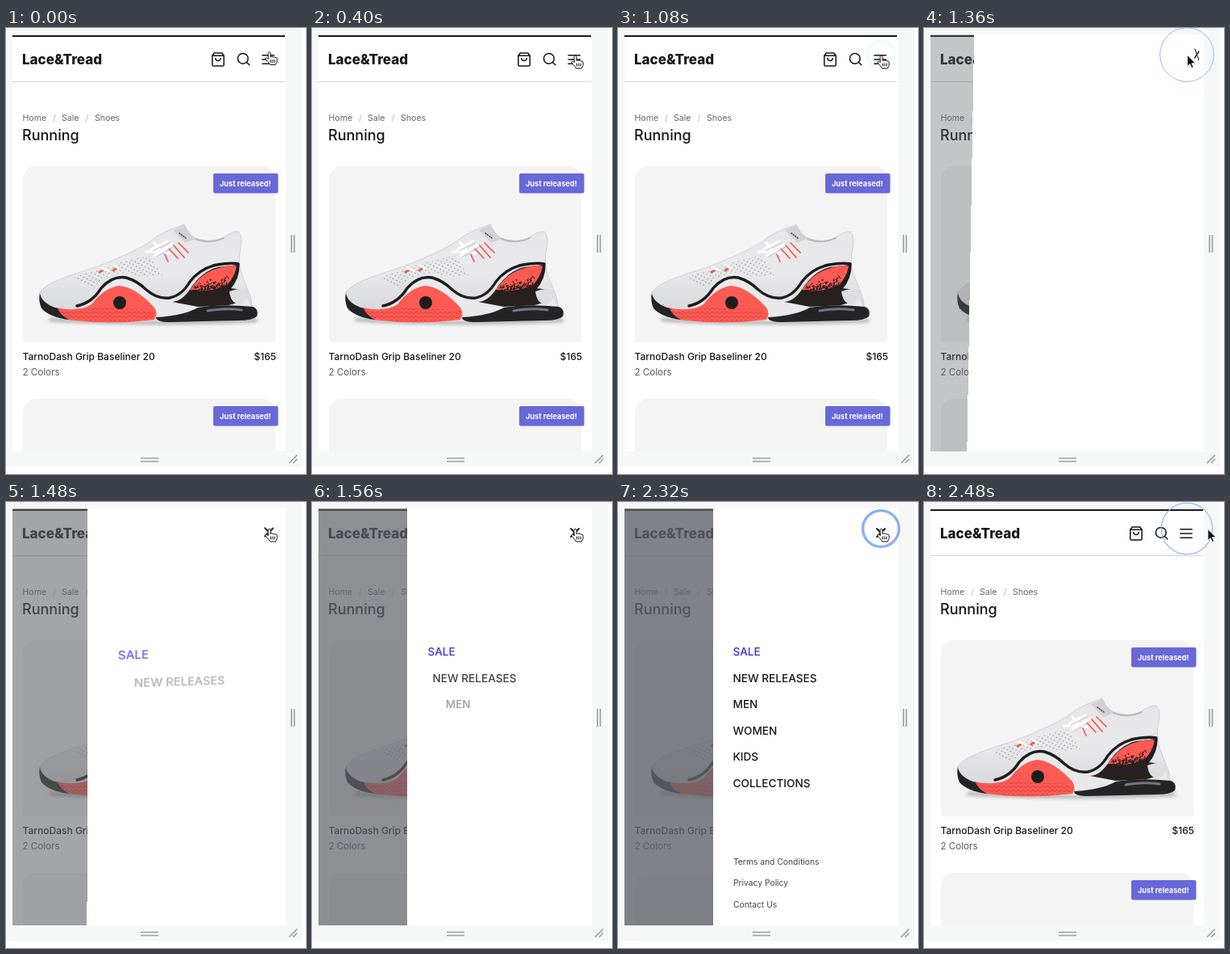
Recreate the animation shown at these times as an HTML page. Size 372 by 552 pixels, loop 2.52 s.

```html
<!DOCTYPE html>
<html lang="en">
<head>
<meta charset="utf-8">
<title>Swinging menu drawer</title>
<style>
  html, body { margin: 0; width: 372px; height: 552px; overflow: hidden; background: #fff; }
  svg { position: absolute; left: 0; top: 0; display: block; }
  text { font: 500 12px Inter, sans-serif; fill: #16161a; white-space: pre; }
  .logo { font-size: 17px; font-weight: 800; }
  .heading { font-size: 18px; }
  .crumb { font-size: 10.6px; font-weight: 400; fill: #66666c; }
  .slash { font-size: 10.6px; fill: #c4c4c8; }
  .colors { font-size: 11.6px; font-weight: 400; fill: #5a5a60; }
  .badge text { font-size: 9.2px; font-weight: 700; fill: #fff; }
  .item { font-size: 13.6px; }
  .item:first-child { fill: #3a30d0; }
  .legal { font-size: 10.3px; font-weight: 400; fill: #44444a; }
  .icon { fill: none; stroke: #16161a; stroke-width: 1.9; stroke-linecap: round; stroke-linejoin: round; }
  #viewport { position: absolute; left: 8px; top: 8px; width: 339px; height: 516px; overflow: hidden; }
  #backdrop { position: absolute; inset: 0; background: rgb(96, 99, 104); }
  #drawer { position: absolute; left: 110px; top: 0; width: 229px; height: 516px; background: #fff;
    box-shadow: 60px 0 #fff, 60px 60px #fff; transform-origin: 100% 22%; }
</style>
</head>
<body>
<svg width="372" height="552">
  <defs>
    <pattern id="holes" width="7" height="6" patternUnits="userSpaceOnUse" patternTransform="rotate(-14)">
      <circle cx="1.6" cy="1.5" r=".8" fill="#85858a"/><circle cx="5.1" cy="4.5" r=".8" fill="#85858a"/>
    </pattern>
    <pattern id="tread" width="6" height="5" patternUnits="userSpaceOnUse">
      <path d="M0 4l3-3 3 3" fill="none" stroke="#d8403a"/>
    </pattern>
    <linearGradient id="leather" x2="0" y2="1">
      <stop stop-color="#e6e6e8"/><stop offset=".5" stop-color="#e9e9eb"/><stop offset="1" stop-color="#d6d7da"/>
    </linearGradient>
    <filter id="soft" x="-10%" width="120%" y="-200%" height="500%"><feGaussianBlur stdDeviation="2"/></filter>
    <g id="badge" class="badge">
      <rect x="257" y="180" width="80.5" height="24.5" rx="2" fill="#6868d8"/>
      <text x="265" y="195.5">Just released!</text>
    </g>
  </defs>

  <rect width="367" height="543" fill="#f6f7f7"/>
  <rect x="8" y="8" width="339" height="516" fill="#fff"/>
  <rect x="8" y="9" width="338" height="2" fill="#18181e"/>
  <path d="M8 66.5H346" stroke="#d6d6d8"/>
  <text class="logo" x="20" y="45">Lace&amp;Tread</text>
  <g class="icon">
    <path transform="translate(253.4 29.4) scale(.8)" d="M6 2 3 6v14a2 2 0 0 0 2 2h14a2 2 0 0 0 2-2V6l-3-4zM3 6h18M16 10a4 4 0 0 1-8 0"/>
    <path transform="translate(285 29) scale(.8)" d="M3 11a8 8 0 1 0 16 0a8 8 0 1 0-16 0M21 21l-4.4-4.4"/>
    <path transform="translate(315.5 29.4) scale(.8)" d="M3 5.5h18M3 12h18M3 18.5h18"/>
  </g>

  <text class="crumb" x="20.5" y="115">Home</text>
  <text class="slash" x="58" y="115">/</text>
  <text class="crumb" x="69" y="115">Sale</text>
  <text class="slash" x="98.5" y="115">/</text>
  <text class="crumb" x="110" y="115">Shoes</text>
  <text class="heading" x="20" y="139">Running</text>

  <path d="M21 187a16 16 0 0 1 16-16H318a16 16 0 0 1 16 16V385a4 4 0 0 1-4 4H25a4 4 0 0 1-4-4z" fill="#f4f4f4"/>
  <path d="M21 524V475a16 16 0 0 1 16-16H318a16 16 0 0 1 16 16V524z" fill="#f4f4f4"/>

  <g stroke-linecap="round" stroke-linejoin="round">
    <path d="M55 361Q170 368 310 362" fill="none" stroke="#aaa" stroke-width="4" filter="url(#soft)"/>
    <path d="M42 327C52 313 82 306 116 294C146 282 172 271 187 258C198 252 206 248 211 247L221 243Q226 255 235 260Q250 266 267 261Q280 251 288 252Q294 257 291 272Q287 288 292 304L304 335L306 350L190 357L70 356L46 346Q39 336 42 327z" fill="url(#leather)" stroke="#c6c6ca" stroke-width=".7"/>
    <path d="M207 250l14-6q6 11 14 17l-13 5z" fill="#d2d2d6"/>
    <path d="M235 261Q252 268 270 260" fill="none" stroke="#b9b9be" stroke-width="2"/>
    <path d="M82 310Q130 291 178 282L194 306Q168 310 148 303Q124 304 108 322z" fill="url(#holes)"/>
    <path d="M90 346Q108 340 121 320Q145 300 165 315Q186 336 206 334L296 327L306 350L190 363L176 360z" fill="#e9e9eb"/>
    <path d="M62 346Q90 352 106 342Q121 322 140 319Q160 320 184 346Q189 354 184 361Q130 368 76 361Q62 356 62 346z" fill="#fb5b53"/>
    <path d="M64 348Q92 352 110 346L180 349L184 360Q130 366 77 360Q66 356 64 348z" fill="url(#tread)"/>
    <path d="M42 328Q44 341 64 347Q67 355 78 361Q54 358 44 347Q40 338 42 328z" fill="#242427"/>
    <path d="M186 358Q220 356 238 346Q268 341 306 345Q314 348 311 357Q306 362 288 362L204 364Q186 364 186 358z" fill="#242427"/>
    <path d="M250 350Q271 346 292 349" fill="none" stroke="#77777d" stroke-width="3"/>
    <path d="M206 339Q220 338 231 319Q245 300 263 296L287 293Q285 310 278 322Q294 324 299 326Q294 340 276 343L238 345z" fill="#28201f"/>
    <path d="M228 324Q243 302 264 297Q280 292 286 295Q283 309 274 318Q252 328 228 324z" fill="#fb5b53"/>
    <g id="speckles"/>
    <path d="M277 326Q290 321 298 324Q303 334 292 342Q279 343 277 326z" fill="#dedee1"/>
    <path d="M88 344Q107 340 118 322Q132 306 149 309Q163 313 174 324Q188 336 203 334Q218 331 228 314Q241 297 262 293Q279 290 288 292Q288 310 277 322" fill="none" stroke="#1d1d20" stroke-width="3.4"/>
    <circle cx="141" cy="340" r="8" fill="#1d1d20"/>
    <path d="M195 276l6 13M200 271l13 14M207 268l14 16M214 266l12 12" stroke="#f2574e" stroke-width="1.7"/>
    <path d="M181 274l19-10M185 281l21-13M184 266q8 12 18 13M174 277l16-1" fill="none" stroke="#fff" stroke-width="3.4"/>
    <path d="M182 276l20-10M187 283l20-12" stroke="#b5b5ba" stroke-width=".8"/>
    <path d="M116 302l4-2M133 300l3-2" stroke="#f2574e" stroke-width="3"/>
    <path d="M118 297l8 3M134 293l5 4" stroke="#fff" stroke-width="3"/>
    <path d="M215 254l8 6" stroke="#444" stroke-width="1.5" stroke-dasharray="1 2"/>
  </g>

  <use href="#badge"/>
  <use href="#badge" y="288"/>
  <text x="20.5" y="411">TarnoDash Grip Baseliner 20</text>
  <text x="335" y="411" text-anchor="end">$165</text>
  <text class="colors" x="20.5" y="430">2 Colors</text>
</svg>

<div id="viewport">
  <div id="backdrop"></div>
  <div id="drawer">
    <svg width="229" height="516" viewBox="118 8 229 516">
      <path class="icon" d="M331 33l-10 10M321 33l10 10"/>
      <g id="menu"></g>
      <g id="legal"></g>
    </svg>
  </div>
</div>

<svg width="372" height="552">
  <path d="M354 256v22M357.5 256v22M167 532.5h22M167 536.5h22M351 538.5l10-10M356 538.5l5-5" fill="none" stroke="#9c9da0" stroke-width="1.6"/>
  <circle id="ring" cx="326" cy="33" fill="none" stroke="#8ab1f2"/>
  <g id="hand" stroke="#111" stroke-linejoin="round" stroke-linecap="round">
    <path d="M-1.5 1C-1.5-.8 1.5-.8 1.5 1V6q1.5-1.6 3 0q1.5-1 2.8 .6q2-.6 2.3 1.2V12l-2 3.5H1C-1 12-3 10.5-4.5 8.5c-1-2 1.2-2.4 3-.5z" fill="#fff"/>
    <path d="M2 9.5v3M4.3 9.5v3M6.6 9.5v3"/>
  </g>
  <path id="arrow" d="M0 0V14l3.2-3 2.2 5 2.2-1-2.2-4.8H10z" fill="#111" stroke="#fff" stroke-width=".8"/>
</svg>

<script>
const LOOP = 2520, OPEN = 1160, CLOSE = 2390, CLICKS = [1075, 2240];
const $ = id => document.getElementById(id);
const progress = (t, start, length) => Math.min(1, Math.max(0, (t - start) / length));
const mix = (a, b, p) => a + (b - a) * p;
const easeOut = p => 1 - (1 - p) ** 3;
const easeInOut = p => p < .5 ? 4 * p ** 3 : 1 - 4 * (1 - p) ** 3;

function add(parent, tag, attrs, text = '') {
  const node = document.createElementNS('http://www.w3.org/2000/svg', tag);
  for (const key in attrs) node.setAttribute(key, attrs[key]);
  node.textContent = text;
  return parent.appendChild(node);
}

const items = ['SALE', 'NEW RELEASES', 'MEN', 'WOMEN', 'KIDS', 'COLLECTIONS'].map((label, i) =>
  add($('menu'), 'text', { class: 'item', x: 142.5, y: 190 + 32.6 * i }, label));
['Terms and Conditions', 'Privacy Policy', 'Contact Us'].forEach((label, i) =>
  add($('legal'), 'text', { class: 'legal', x: 143, y: 448.5 + 26.5 * i }, label));

// Dark paint spatter, denser towards the sole
let seed = 7;
const random = () => (seed = seed * 16807 % 2147483647) / 2147483647;
for (let i = 0; i < 170; i++) {
  const along = random(), depth = Math.sqrt(random());
  add($('speckles'), 'circle', {
    cx: 232 + 44 * along, cy: mix(317 - 12 * along, 326 - 5 * along, depth),
    r: .4 + .7 * random(), fill: '#28201f'
  });
}

function drawRing(t) {
  const click = CLICKS.find(start => t >= start && t < start + 320);
  const p = click === undefined ? 1 : (t - click) / 320;
  $('ring').setAttribute('r', 34 - 18 * (1 - p) ** 1.5);
  $('ring').setAttribute('stroke-width', Math.max(.9, 4.5 * (1 - p)));
  $('ring').style.opacity = p < 1 ? Math.min(1, p * 4) : 0;
}

function drawCursor(t) {
  const leave = easeInOut(progress(t, 2340, 130));
  const x = mix(326.5, 352, leave);
  const y = t < OPEN ? mix(30, 34.5, easeOut(progress(t, 0, 320))) : 33.5;
  const isArrow = t > 1200 && t < 1480 || t > CLOSE;
  for (const id of ['hand', 'arrow']) {
    $(id).setAttribute('transform', `translate(${x} ${y})`);
    $(id).style.display = (id === 'arrow') === isArrow ? '' : 'none';
  }
}

function drawDrawer(t) {
  $('viewport').style.display = t >= OPEN && t < CLOSE ? '' : 'none';
  $('backdrop').style.opacity = .8 * progress(t, 1150, 460);
  const closed = 1 - easeInOut(progress(t, 1205, 370));
  $('drawer').style.transform = `skewX(${-1.4 * closed}deg) perspective(320px) rotateY(${90 * closed}deg)`;
  items.forEach((item, i) => {
    const p = easeOut(progress(t, 1376 + 71 * i, 260));
    item.setAttribute('transform', `translate(${40 * (1 - p)} 0)`);
    item.style.opacity = p;
  });
  $('legal').style.opacity = progress(t, 1750, 300);
}

function draw(now) {
  const t = now % LOOP;
  drawDrawer(t);
  drawRing(t);
  drawCursor(t);
  requestAnimationFrame(draw);
}
draw(0);
</script>
</body>
</html>
```
